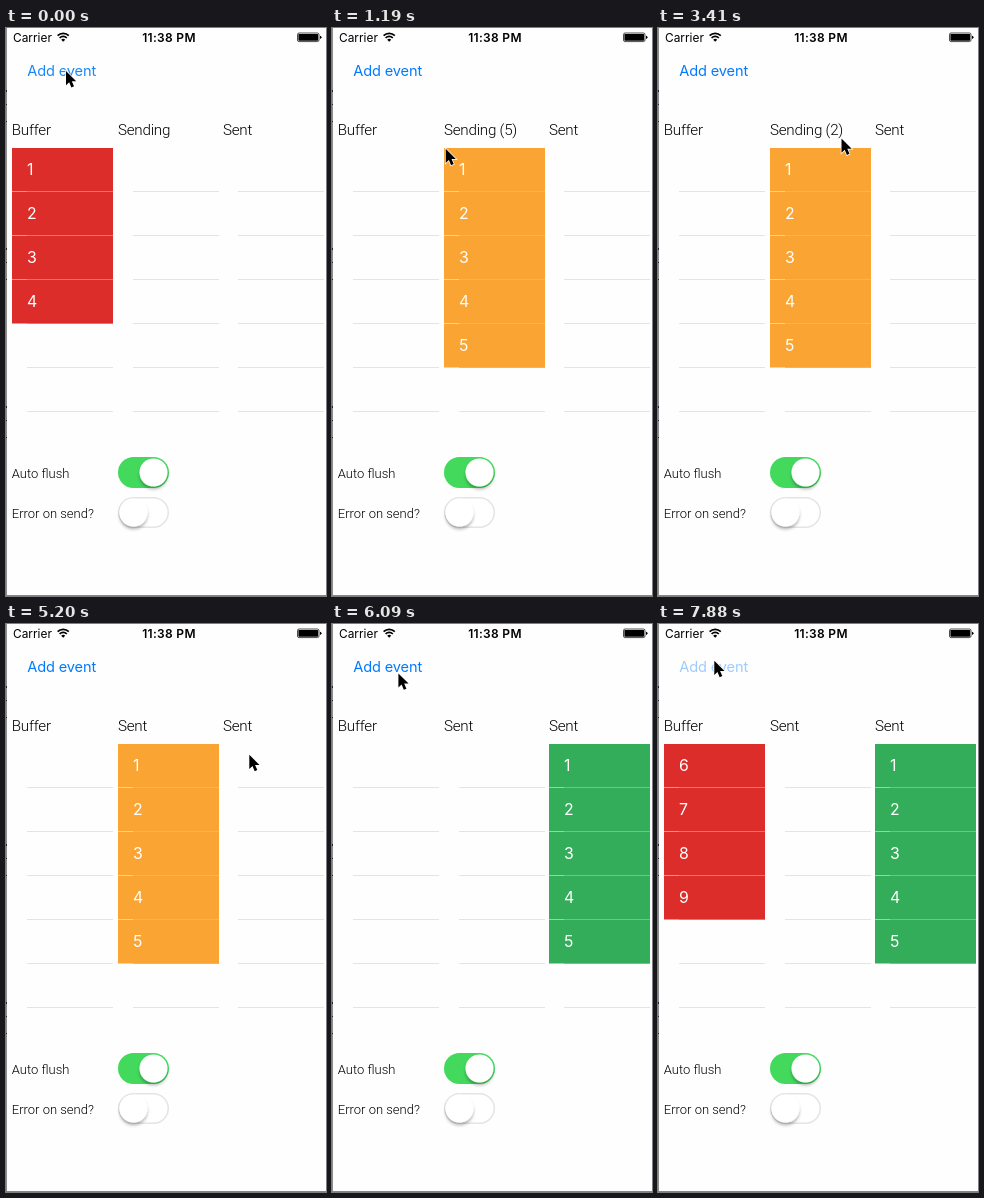
These frames come from a looping animation (320x568 px, 8 s). An HTML page:

```html
<!DOCTYPE html>
<html lang="en">
<head>
<meta charset="utf-8">
<title>Event buffer</title>
<style>
  html, body { margin: 0; width: 100%; height: 100%; overflow: hidden; background: #fefefe; }
  svg { display: block; width: 100vw; height: 100vh; }
  text { font-family: Inter, "Liberation Sans", sans-serif; fill: #000; white-space: pre; }
  .status { font-size: 11.9px; }
  .time { font-size: 12px; font-weight: 600; letter-spacing: .3px; text-anchor: middle; }
  .button { font-size: 14.6px; letter-spacing: -.15px; fill: #007aff; }
  .head, .label { font-family: Roboto, "Liberation Sans", sans-serif; font-weight: 300; }
  .head { font-size: 15.2px; letter-spacing: -.25px; }
  .label { font-size: 13px; }
  .num { font-size: 15.8px; fill: #fff; }
</style>
</head>
<body>
<svg viewBox="0 0 320 568" preserveAspectRatio="none">
  <defs>
    <filter id="shadow" x="-30%" y="-30%" width="160%" height="170%">
      <feDropShadow dx="0" dy="2.8" stdDeviation="1.8" flood-opacity=".28"/>
    </filter>
  </defs>
  <rect width="320" height="568" fill="#fefefe"/>
  <path d="M.5 0V568" stroke="#8c8c8c"/>
  <path d="M.5 62V460" stroke="#23233c" stroke-dasharray="2 12 1 16 1 126"/>
  <path d="M0 567.5H320" stroke="#858585"/>

  <text class="status" x="7" y="14">Carrier</text>
  <g fill="none" stroke="#000" stroke-width="1.7">
    <path d="M51.6 7.7a8 8 0 0 1 11.2 0M53.6 10a5 5 0 0 1 7.2 0"/>
    <path d="M57.2 13.8l-2-2.1a2.9 2.9 0 0 1 4 0z" fill="#000" stroke="none"/>
  </g>
  <text class="time" x="163" y="14">11:38 PM</text>
  <rect x="291.5" y="5" width="21.5" height="8.6" rx="1.6" fill="none" stroke="#000" stroke-width=".7"/>
  <rect x="292.4" y="5.9" width="19.7" height="6.8" rx=".7"/>
  <path d="M314 7.7q1.5 .3 1.5 1.6t-1.5 1.6z"/>

  <text id="add" class="button" x="21.3" y="48">Add event</text>
  <text class="head" x="5.8" y="107.3">Buffer</text>
  <text id="sending" class="head" x="112" y="107.3"></text>
  <text class="head" x="217" y="107.3">Sent</text>
  <g id="tables"></g>

  <text class="label" x="5.8" y="449.5">Auto flush</text>
  <rect x="112" y="429" width="51" height="31" rx="15.5" fill="#43d95d"/>
  <circle cx="147.5" cy="444.5" r="14" fill="#fff" filter="url(#shadow)"/>
  <text class="label" x="5.8" y="489.5">Error on send?</text>
  <rect x="112.75" y="469.75" width="49.5" height="29.5" rx="14.75" fill="#fff" stroke="#e4e4e4" stroke-width="1.5"/>
  <circle cx="127.5" cy="484.5" r="14" fill="#fff" filter="url(#shadow)"/>

  <path id="cursor" d="M0 0V14.2L3.2 11.2L5.4 16.4L8 15.3L5.8 10.2H10.2Z"
        fill="#000" stroke="#fff" stroke-width="1.5" paint-order="stroke"/>
</svg>
<script>
const LOOP = 8000, TICK = 148.1, ROWS = 6, ROW_H = 44, TOP = 120, INSET = 15;
const $ = id => document.getElementById(id);

function make(tag, attrs, parent) {
  const el = document.createElementNS("http://www.w3.org/2000/svg", tag);
  for (const key in attrs) el.setAttribute(key, attrs[key]);
  return parent.appendChild(el);
}

function makeTable(x, fill) {
  const rows = [];
  for (let i = 0; i < ROWS; i++) {
    const y = TOP + i * ROW_H;
    const cell = make("g", {}, $("tables"));
    make("rect", { x, y, width: INSET, height: ROW_H - .5, fill }, cell);
    make("rect", { x: x + INSET, y, width: 86, height: ROW_H, fill }, cell);
    const num = make("text", { class: "num", x: x + INSET, y: y + 27 }, cell);
    make("rect", { x: x + INSET, y: y + ROW_H - .5, width: 86, height: .5, fill: "#c8c7cc" }, $("tables"));
    rows.push({ cell, num });
  }
  return (first, count) => rows.forEach(({ cell, num }, i) => {
    cell.style.display = i < count ? "" : "none";
    num.textContent = first + i;
  });
}

const setBuffer = makeTable(6, "#dc2d2b");
const setSending = makeTable(112, "#faa533");
const setSent = makeTable(217, "#34ad5a");

// All times below are in ticks
const HOME = { x: 60, y: 43 };
const moves = [
  { from: 3, to: 9, x: 118, y: 127 },
  { from: 14, to: 16, x: 121, y: 135 },
  { from: 16, to: 23, x: 183.5, y: 110.5 },
  { from: 27, to: 29, x: 191.5, y: 110.5 },
  { from: 33, to: 35, x: 243.3, y: 130.8 },
  { from: 35, to: 37, x: 257, y: 158 },
  { from: 38, to: 41, x: 66.4, y: 49.4 },
  { from: 41, to: 43, x: 56.3, y: 36.8 }
];
const clicks = [-1, 2, 45, 48, 51, 53];
const FLUSH = 2, COUNT_STEP = 6.4, MOVED = 36;

function pointerAt(n) {
  let { x, y } = HOME;
  for (const m of moves) {
    const k = Math.min(1, Math.max(0, (n - m.from) / (m.to - m.from)));
    const ease = k * k * (3 - 2 * k);
    x += (m.x - x) * ease;
    y += (m.y - y) * ease;
  }
  return [x, y];
}

// Dim while pressed, fade back after release
function buttonOpacity(n) {
  if (clicks.includes(n + 1) && n > 0) return .2;
  const age = n - Math.max(...clicks.filter(c => c <= n));
  return Math.min(1, .38 + .52 * age);
}

function draw(n) {
  const [x, y] = pointerAt(n);
  $("cursor").setAttribute("transform", `translate(${x} ${y})`);
  $("add").setAttribute("opacity", buttonOpacity(n));

  const flushed = n >= FLUSH;
  const left = 5 - Math.floor((n - FLUSH) / COUNT_STEP);
  $("sending").textContent = !flushed ? "Sending" : left > 0 ? `Sending (${left})` : "Sent";

  if (flushed) setBuffer(6, clicks.filter(c => c > FLUSH && c <= n).length);
  else setBuffer(1, 4);
  setSending(1, flushed && n < MOVED ? 5 : 0);
  setSent(1, n >= MOVED ? 5 : 0);
}

// The screen refreshes in discrete ticks
const start = performance.now();
let last = -1;
function frame() {
  const t = (performance.now() - start) % LOOP;
  const n = Math.min(53, Math.floor(t / TICK));
  if (n !== last) draw(last = n);
  requestAnimationFrame(frame);
}
frame();
</script>
</body>
</html>
```
